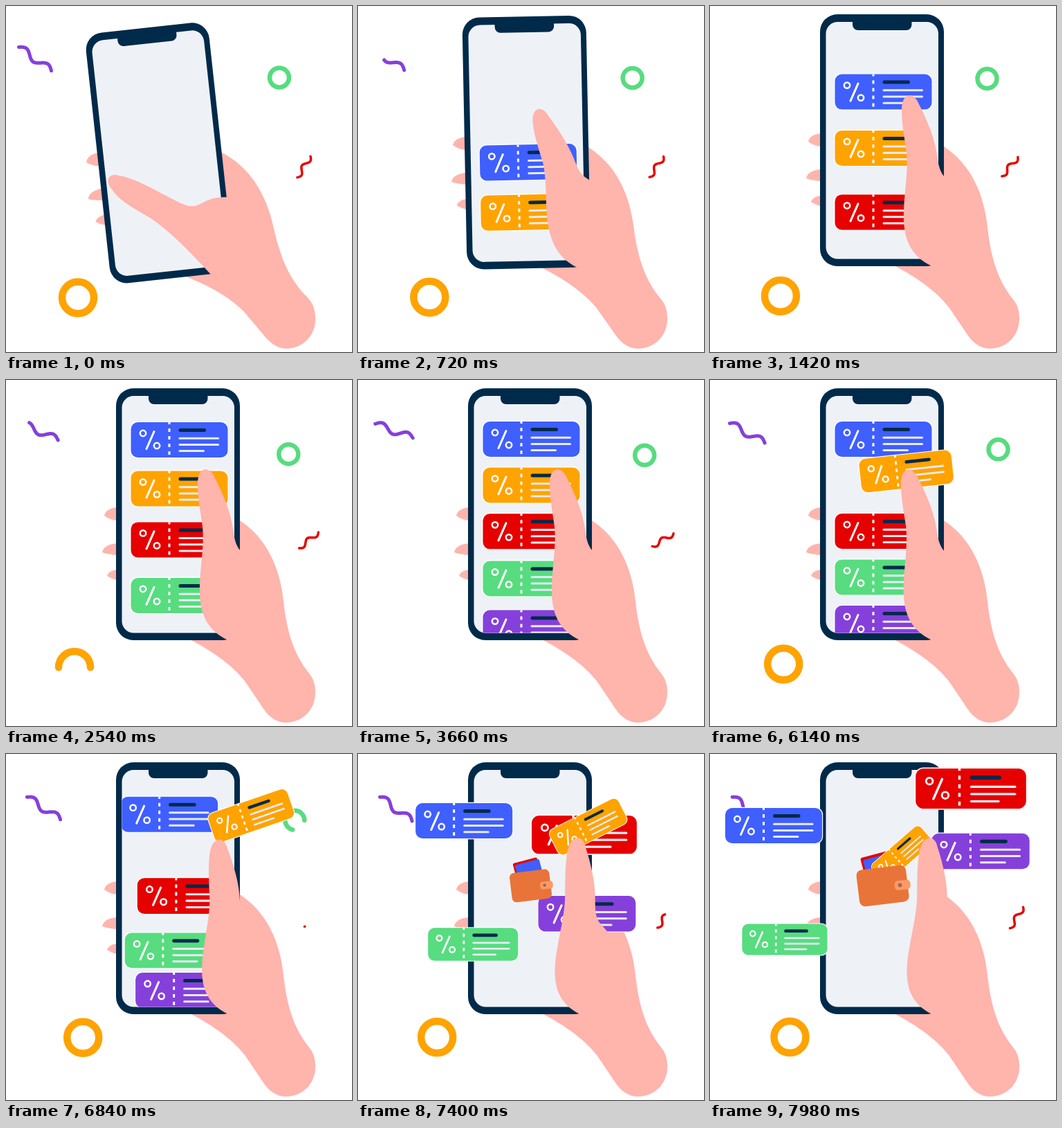
These frames come from a looping animation (500x500 px, 8 s). An HTML page with a canvas:

```html
<!DOCTYPE html>
<html lang="en">
<head>
<meta charset="utf-8">
<title>Coupon wallet</title>
<style>
html, body { margin: 0; width: 100%; height: 100%; overflow: hidden; background: #fff; }
canvas { display: block; width: 500px; height: 500px; }
</style>
</head>
<body>
<canvas id="stage" width="500" height="500"></canvas>
<script>
const ctx = document.getElementById('stage').getContext('2d');
const NAVY = '#002a4a', SKIN = '#ffb4ac', PAPER = '#eef2f7', WHITE = '#fff';
const BLUE = '#3f5fff', ORANGE = '#ffa300', RED = '#e60000', GREEN = '#57dc7f', PURPLE = '#8540db';
const LOOP = 8000, LAST = 171;

const rad = deg => deg * Math.PI / 180;
const mix = (a, b, u) => a + (b - a) * u;
const blend = (a, b, u) => a.map((v, i) => mix(v, b[i], u));
const progress = (n, from, to) => Math.min(1, Math.max(0, (n - from) / (to - from)));
function ramp(n, from, to) {
  const u = progress(n, from, to);
  return u * u * (3 - 2 * u);
}

// Eases from pose a to b to c, arriving at b at step `turn`.
const via = (n, a, b, c, start, turn) =>
  n < turn ? blend(a, b, ramp(n, start, turn)) : blend(b, c, ramp(n, turn, LAST));

// Visible part of a line that is wiped out from step `out` and is whole again at `back`.
const wipe = (n, out, back, length) =>
  1 - progress(n, out, out + length) + progress(n, back - length, back);

// The picture advances three steps every 140 ms, in an uneven rhythm.
function stepAt(ms) {
  const rest = ms % 140;
  return 3 * Math.floor(ms / 140) + (rest >= 20) + (rest >= 120);
}

function scoped(draw) { ctx.save(); draw(); ctx.restore(); }

function box(x, y, w, h, r, color) {
  ctx.beginPath();
  ctx.roundRect(x, y, w, h, r);
  ctx.fillStyle = color;
  ctx.fill();
}

function stroke(color, width, cap = 'round') {
  ctx.strokeStyle = color;
  ctx.lineWidth = width;
  ctx.lineCap = cap;
  ctx.stroke();
}

function line(x1, y1, x2, y2, color, width, cap) {
  ctx.beginPath();
  ctx.moveTo(x1, y1);
  ctx.lineTo(x2, y2);
  stroke(color, width, cap);
}

function circle(x, y, r) {
  ctx.beginPath();
  ctx.arc(x, y, r, 0, 2 * Math.PI);
}

// Loose confetti around the phone

function ring([x, y], part, r, width, color, start, dir) {
  if (part <= 0) return;
  ctx.beginPath();
  ctx.arc(x, y, r, start, start + dir * part * 2 * Math.PI, dir < 0);
  stroke(color, width);
}

function squiggle([x, y, angle], from, to, length, amp, width, color) {
  if (from >= to) return;
  scoped(() => {
    ctx.translate(x, y);
    ctx.rotate(rad(angle));
    ctx.beginPath();
    for (let i = 0; i <= 40; i++) {
      const u = mix(from, to, i / 40);
      ctx.lineTo((u - 0.5) * length, -amp * Math.sin(3 * Math.PI * u));
    }
    ctx.lineJoin = 'round';
    stroke(color, width);
  });
}

function drawConfetti(n) {
  const drift = (a, b, c) => via(n, a, b, c, 0, 90);
  squiggle(drift([42, 76.5, 36], [52.5, 73.5, 20], [55, 80, 38]),
    1 - wipe(n, 8, 58, 18), 1, 58, 5, 5, PURPLE);
  squiggle(drift([430.5, 232.5, -58], [441, 231, -30], [443, 236.5, -58]),
    0, wipe(n, 109, 165.8, 20), 36, -3.5, 3.5, RED);
  ring(drift([395, 103.5], [415, 109], [418, 92]),
    wipe(n, 142, 2 * LAST, 14), 14, 6.5, GREEN, 0, -1);
  ring(drift([104, 421.5], [96.5, 412], [115.5, 409]),
    wipe(n, 37, 61, 12) * wipe(n, 66, 92, 12), 23, 10.5, ORANGE, Math.PI, 1);
}

// Hand and phone

const handBack = new Path2D('M250 370L268 376C288 387 322 406 345 435L372 475C380 487 391 495 404 495' +
  'C430 495 447 475 447 452C447 440 444 431 438 424C416 396 406 365 401 320C396 270 376 228 338 203L250 203Z');
const screen = new Path2D();
screen.roundRect(167.5, 23, 162.5, 342.5, 17);

function finger(tipX, tipY, top, bottom) {
  ctx.beginPath();
  ctx.moveTo(160, top);
  ctx.quadraticCurveTo(tipX + 2, top + 2, tipX, tipY);
  ctx.quadraticCurveTo(tipX + 8, bottom - 1, 160, bottom);
  ctx.fill();
}

// Thumb outline, from the palm around the tip to the phone's edge: cubic curves
const thumbFlat = [[303, 376], [280, 345], [247, 301], [217, 280], [200, 267], [183, 256], [174, 238],
  [164, 222], [176, 215], [186, 220], [215, 227], [255, 262], [280, 274], [300, 281], [305, 263], [338, 268]];
const thumbUp = [[321, 376], [255, 345], [290, 270], [284, 212], [281, 190], [277, 170], [277, 150],
  [277, 124], [295, 124], [302, 142], [314, 165], [325, 192], [328, 215], [330, 230], [332, 238], [338, 246]];

function drawThumb(raise, swing) {
  const points = thumbUp.map((up, i) => {
    const [x, y] = blend(thumbFlat[i], up, raise);
    const bend = swing * Math.max(0, (376 - y) / 246) ** 1.6;
    return [x + bend, y - 0.28 * bend];
  });
  ctx.beginPath();
  ctx.moveTo(...points[0]);
  for (let i = 1; i < points.length; i += 3) ctx.bezierCurveTo(...points.slice(i, i + 3).flat());
  ctx.lineTo(365, 262);
  ctx.lineTo(385, 320);
  ctx.lineTo(350, 385);
  ctx.fillStyle = SKIN;
  ctx.fill();
}

function drawPhone() {
  ctx.fillStyle = SKIN;
  ctx.fill(handBack);
  finger(142, 196, 184, 203);
  finger(139, 249, 236, 253);
  finger(146, 283, 274, 289);
  box(159, 12, 179, 364, 25, NAVY);
  ctx.fillStyle = PAPER;
  ctx.fill(screen);
  box(206, 15, 85.5, 20, [0, 0, 8, 8], NAVY);
}

// Coupons rise into the list, then fly to `exit` (x, y, scale, angle)

const coupons = [
  { color: BLUE, exit: [92, 103.5, 1, 0] },
  { color: ORANGE, peak: [359.5, 86, 0.855, -20], exit: [277, 144.5, 0.66, -41] },
  { color: RED, exit: [377, 50, 1.14, 0] },
  { color: GREEN, exit: [108, 268, 0.88, 0] },
  { color: PURPLE, exit: [391, 140.5, 1.01, 0] }
];

function couponPose(n, i) {
  const { peak, exit } = coupons[i];
  const settled = 71.2 + 44 * (i / 4) ** 0.85;
  const speed = 0.044 + 0.018 * 0.35 ** i;
  const lag = (speed * Math.max(0, settled - n)) ** 4;
  const home = [250.5, 85.5 + 66.5 * i + lag, 1, 0];
  return peak
    ? via(n, home, peak, exit, 120, 150)
    : blend(home, exit, ramp(n, 140.3 + 0.12 * i * i, LAST));
}

function drawCoupon(n, i) {
  const { color, peak } = coupons[i];
  const [x, y, scale, angle] = couponPose(n, i);
  scoped(() => {
    if (n <= (peak ? 120 : 146)) ctx.clip(screen);
    ctx.translate(x, y);
    ctx.rotate(rad(angle));
    ctx.scale(scale, scale);
    ctx.translate(-70, -25.5);
    box(-1.2, -1.2, 142.4, 53.4, 11, WHITE);
    box(0, 0, 140, 51, 10, color);
    for (const [cx, cy] of [[17.5, 16], [37.5, 34]]) {
      circle(cx, cy, 4.2);
      stroke(WHITE, 2.5);
    }
    line(33.5, 13.5, 22.5, 38.5, WHITE, 3);
    ctx.setLineDash([5, 6]);
    ctx.lineDashOffset = 2;
    line(55.5, 0, 55.5, 51, WHITE, 3, 'butt');
    ctx.setLineDash([]);
    line(71.5, 11.5, 106, 11.5, NAVY, 5);
    for (let row = 0; row < 3; row++) {
      const rowY = 23.2 + 9.2 * row;
      line(70.5, rowY, row < 2 ? 126 : 105, rowY, '#e8ecf4', 3);
    }
  });
}

// Wallet that catches the orange coupon

function inWallet(n, draw) {
  const size = ramp(n, 148, 162);
  if (size <= 0) return;
  scoped(() => {
    ctx.translate(249.5, 190);
    ctx.scale(size, size);
    draw();
  });
}

function walletBack() {
  ctx.translate(-32.5, -39.5);
  ctx.rotate(-0.26);
  box(0, 0, 45, 30, 3, RED);
  box(3, 4, 45, 30, 3, BLUE);
}

function walletFront() {
  ctx.rotate(rad(-7));
  box(-36, -26, 72, 53, 8, '#e97439');
  box(17, -4, 23, 13.5, 5, '#ff9a66');
  circle(25, 2.5, 3);
  ctx.fillStyle = '#a0695a';
  ctx.fill();
}

function draw(n) {
  ctx.fillStyle = WHITE;
  ctx.fillRect(0, 0, 500, 500);
  drawConfetti(n);
  const raise = ramp(n, 0, 22);
  const swing = 36 * ramp(n, 122, 158) - 7 * ramp(n, 108, 118);
  scoped(() => {
    ctx.translate(405, 450);
    ctx.rotate(rad(-6.2 * (1 - raise)));
    ctx.translate(-405, -450);
    drawPhone();
    coupons.forEach((coupon, i) => coupon.peak || drawCoupon(n, i));
    inWallet(n, walletBack);
    drawCoupon(n, coupons.findIndex(coupon => coupon.peak));
    inWallet(n, walletFront);
    drawThumb(raise, swing);
  });
}

const begin = performance.now();
function frame() {
  draw(stepAt((performance.now() - begin) % LOOP));
  requestAnimationFrame(frame);
}
frame();
</script>
</body>
</html>
```
